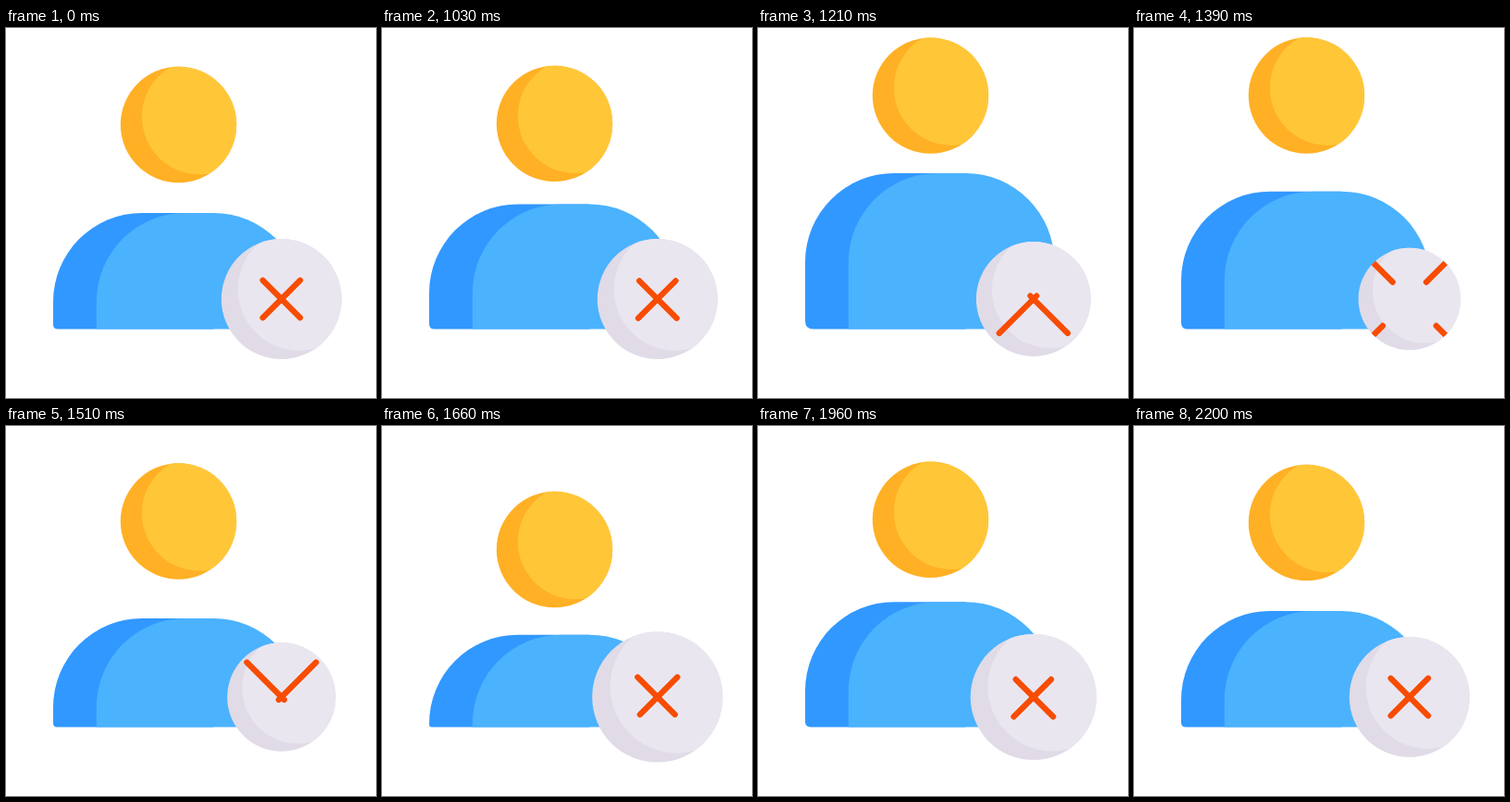
These frames come from a looping animation (400x400 px, 2230 ms). An HTML page:

```html
<!DOCTYPE html>
<html lang="en">
<head>
<meta charset="utf-8">
<title>User removed</title>
<style>
  html, body { margin: 0; height: 100%; overflow: hidden; background: #fff; }
  svg { display: block; width: 100%; height: 100%; }
  #cross { fill: none; stroke: #f74c02; stroke-width: 6.3; stroke-linecap: round; }
</style>
</head>
<body>
<svg viewBox="0 0 400 400">
  <defs>
    <clipPath id="headClip"><circle r="62.7"/></clipPath>
    <clipPath id="discClip"><circle r="65"/></clipPath>
    <clipPath id="crossClip"><circle id="rim" r="65"/></clipPath>
    <path id="arm" d="M-20.2-20.2L20.2 20.2M-107.7-107.7L-67.3-67.3"/>
  </defs>
  <g id="head">
    <circle r="62.7" fill="#ffb024"/>
    <circle cx="22.4" cy="-8.4" r="62" fill="#ffc738" clip-path="url(#headClip)"/>
  </g>
  <path id="shade" fill="#3198ff"/>
  <path id="torso" fill="#4bb2fe"/>
  <g transform="translate(297.8 293)">
    <g id="disc">
      <circle r="65" fill="#e0dbe7"/>
      <g clip-path="url(#discClip)"><circle cx="19.4" cy="-10.6" r="66.4" fill="#eae6f0"/></g>
    </g>
    <g id="cross" clip-path="url(#crossClip)">
      <use class="arm" href="#arm"/>
      <g transform="scale(-1 1)"><use class="arm" href="#arm"/></g>
    </g>
  </g>
</svg>
<script>
const LOOP = 2230, STEP = 30;
const $ = id => document.getElementById(id);
const arms = document.querySelectorAll('.arm');

// S-curve from 0 to 1; p shapes the start and q the end.
const ease = (u, p = 2, q = 2) => u ** p / (u ** p + (1 - u) ** q);

// Eases from pose to pose: [time, value, p, q].
const track = (...poses) => t => {
  const i = poses.findIndex(pose => pose[0] > t);
  if (i === 0) return poses[0][1];
  if (i < 0) return poses[poses.length - 1][1];
  const [t0, a] = poses[i - 1], [t1, b, p, q] = poses[i];
  return a + (b - a) * ease((t - t0) / (t1 - t0), p, q);
};

const headY = track([1000, 104.5], [1300, 70, 1.6, 2.4], [1690, 134, 2.4],
  [2050, 95, 2, 1.6], [2200, 104.5]);
const bodyY = track([1000, 200], [1235, 156.5, 0.75], [1690, 226, 1.6], [2010, 189], [2200, 200]);
const radius = track([1075, 65], [1410, 55.2], [1700, 71], [2230, 65]);
const slide = track([1000, 0], [1730, 88.6, 1.6, 1.6], [1960, 88.6], [2200, 87.5]);

function draw(t) {
  $('head').setAttribute('transform', `translate(186.5 ${headY(t)})`);

  const top = bodyY(t), side = top + 96, c = 5 + (200 - top) * 0.09;
  $('shade').setAttribute('d', `M51 ${side}A96 96 0 0 1 147 ${top}H224V325.5H${51 + c}Q51 325.5 51 ${325.5 - c}Z`);
  $('torso').setAttribute('d', `M97.8 ${side}A96 96 0 0 1 193.8 ${top}H224.3A96 96 0 0 1 320.3 ${side}V325.5H97.8Z`);

  const r = radius(t), d = slide(t);
  $('disc').setAttribute('transform', `scale(${r / 65})`);
  $('rim').setAttribute('r', r);
  arms.forEach(a => a.setAttribute('transform', `translate(${d} ${d})`));
}

const start = performance.now();
function tick() {
  const t = (performance.now() - start) % LOOP;
  draw(Math.floor((t - 10) / STEP) * STEP + 10);
  requestAnimationFrame(tick);
}
tick();
</script>
</body>
</html>
```
